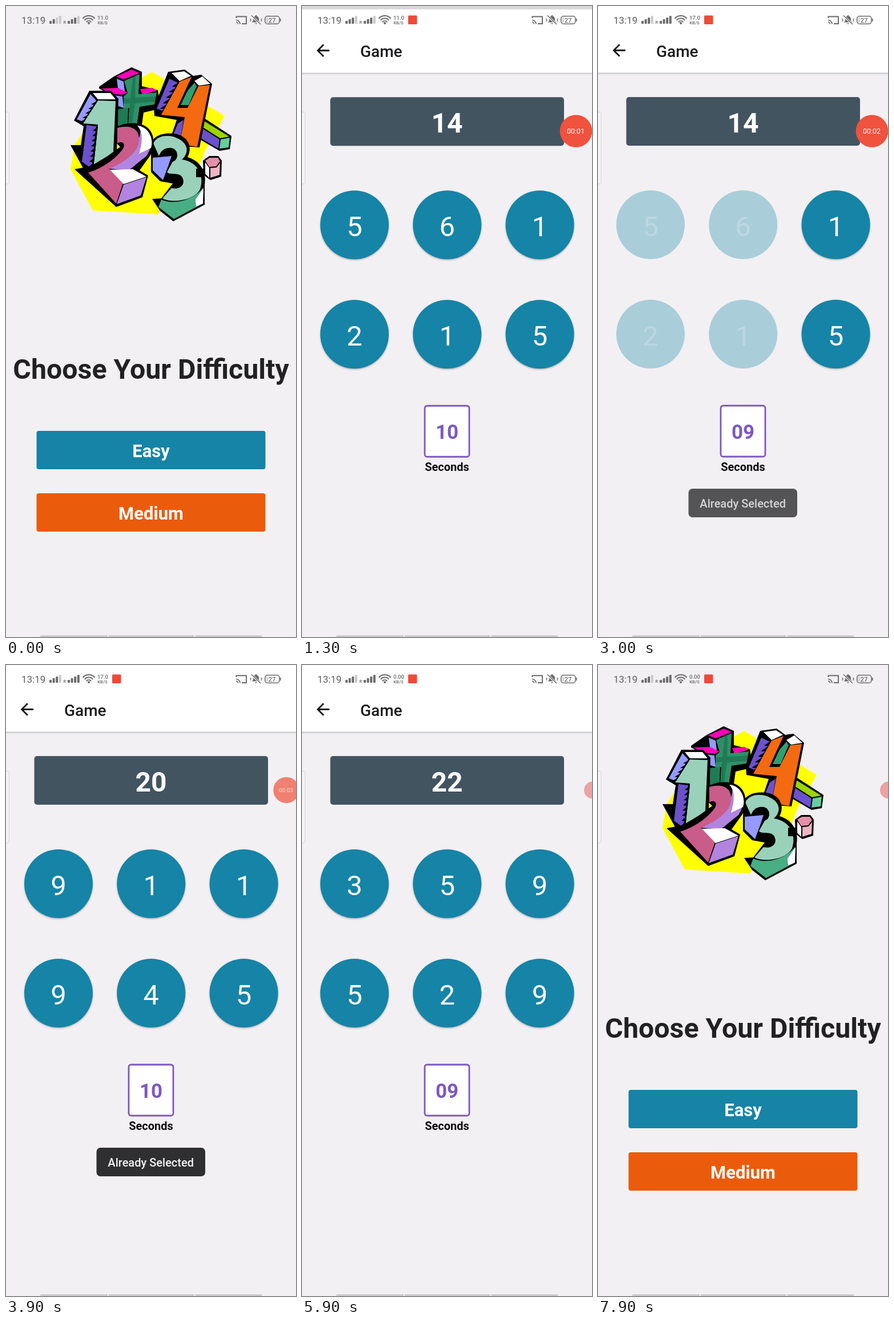
These frames come from a looping animation (508 by 1102 pixels, 8000 ms). An HTML page with a canvas:

```html
<!DOCTYPE html>
<html lang="en">
<head>
<meta charset="utf-8">
<title>Number game</title>
<style>
  html, body { margin: 0; width: 100%; height: 100%; overflow: hidden; background: #f2f0f3; }
  canvas { display: block; width: 508px; height: 1102px; }
</style>
</head>
<body>
<canvas id="stage"></canvas>
<script>
const W = 508, H = 1102, LOOP = 8000;
const BG = '#f2f0f3', TEAL = '#1584a7', GREY = '#6b6b6d';
const canvas = document.getElementById('stage');
const ratio = window.devicePixelRatio || 1;
canvas.width = W * ratio;
canvas.height = H * ratio;
const ctx = canvas.getContext('2d');

// ---------- helpers ----------
const clamp = v => Math.max(0, Math.min(1, v));
const ramp = (t, start, length) => clamp((t - start) / length);
const mix = (a, b, k) => a + (b - a) * k;
const latest = (steps, t) => steps.filter(s => s[0] <= t).pop()[1];

function ease(x) {
  if (x <= 0 || x >= 1) return clamp(x);
  const curve = (a, b, s) => 3 * (1 - s) ** 2 * s * a + 3 * (1 - s) * s * s * b + s ** 3;
  let lo = 0, hi = 1;
  for (let i = 0; i < 24; i++) {
    const mid = (lo + hi) / 2;
    if (curve(0.20833, 0.25, mid) < x) lo = mid; else hi = mid;
  }
  return curve(0.82, 1, lo);
}

function rect(x, y, w, h, color) {
  ctx.fillStyle = color;
  ctx.fillRect(x, y, w, h);
}

function box(x, y, w, h, r, fill, line, width) {
  ctx.beginPath();
  ctx.roundRect(x, y, w, h, r);
  if (fill) { ctx.fillStyle = fill; ctx.fill(); }
  if (line) { ctx.strokeStyle = line; ctx.lineWidth = width; ctx.stroke(); }
}

function disc(x, y, r, color) {
  ctx.beginPath();
  ctx.arc(x, y, r, 0, Math.PI * 2);
  ctx.fillStyle = color;
  ctx.fill();
}

function text(str, x, y, size, weight, color, align = 'center') {
  ctx.font = `${weight} ${size}px Roboto, sans-serif`;
  ctx.textAlign = align;
  ctx.fillStyle = color;
  ctx.fillText(str, x, y);
}

function fill(d, color) {
  ctx.fillStyle = color;
  ctx.fill(new Path2D(d));
}

function line(d, color, width) {
  ctx.strokeStyle = color;
  ctx.lineWidth = width;
  ctx.stroke(new Path2D(d));
}

function shadow(color, blur, dy) {
  ctx.shadowColor = color;
  ctx.shadowBlur = blur * ratio;
  ctx.shadowOffsetY = dy * ratio;
}

// ---------- illustration ----------
const INK = '#000', WHITE = '#fff', BLUE = '#959aff', VIOLET = '#6b52cc';
const LILAC = '#b184e0', MINT = '#9ad1bb', LEAF = '#2f9068', PINK = '#ff00b8', ROSE = '#c95c88';

const plus = [
  [INK, 'M189 123L220 107 238 115V140L266 147 268 160 263 181 241 186 237 214 190 212 192 160 163 144V141Z'],
  [PINK, 'M193 123L220 111 234 117 206 128Z'],
  [PINK, 'M168 144L196 143 213 151 204 155 181 153Z'],
  [PINK, 'M235 145L257 143 264 148 239 155Z'],
  [BLUE, 'M194 127L206 132 208 149 196 143Z'],
  [BLUE, 'M183 155L204 158 206 178 194 174Z'],
  [LEAF, 'M207 131L234 119 232 154 264 151 260 172 234 176 229 210 214 212 216 178 206 180 206 158 213 152Z'],
  ['#1f7a55', 'M196 180L214 178 213 210 196 209Z'],
  ['#1f7a55', 'M222 125L227 123 226 160 262 158 260 167 226 170 220 210H214L217 169 206 171V161H218Z']
];
const minus = [
  [INK, 'M338 190L395 227 392 250 374 253 331 228Z'],
  ['#9bd400', 'M344 199L391 228 375 231 342 210Z'],
  [VIOLET, 'M341 212L374 233 372 249 335 227Z'],
  ['#66cda0', 'M376 233L392 230 390 247 374 249Z']
];
const four = [
  [INK, 'M284 115L313 111 328 122 342 120 361 136 339 247 284 243 299 199 260 192 259 178Z'],
  [VIOLET, 'M286 127L301 134 276 184 264 179Z'],
  [VIOLET, 'M287 239L301 205 311 199 304 241Z'],
  [WHITE, 'M290 117L312 114 324 122 304 131Z'],
  [WHITE, 'M330 131L344 123 358 136 338 139Z'],
  ['#2fa070', 'M318 148L330 134 334 140 320 173 306 173Z'],
  ['#f46a10', 'M304 132L325 124 300 178 318 178 337 140 357 138 335 246 304 241 313 194 271 190Z']
];
const one = [
  [INK, 'M146 148L184 148 197 162 193 285 140 292 113 243 131 243 136 210 119 200Z'],
  [BLUE, 'M148 154L158 165 135 202 124 198Z'],
  [VIOLET, 'M141 208L158 210 150 284 133 272Z'],
  [MINT, 'M161 165L192 166 187 278 153 284 161 207 135 205Z'],
  [WHITE, 'M152 152L183 152 192 163 161 163Z']
];
const three = [
  [INK, 'M254 244C256 224 280 220 300 224C322 230 326 250 318 264C340 270 352 290 348 312V347L293 376 270 358 256 337 272 336 292 310 270 306 254 290Z'],
  [BLUE, 'M257 265L290 262 284 280 275 304 257 287Z'],
  [MINT, 'M258 240C264 226 284 224 298 230C322 240 320 258 308 268C336 272 348 296 340 320C330 340 290 345 274 336L290 318C306 322 316 310 308 298C302 290 286 296 282 290L292 272C304 268 302 250 290 248C276 246 270 256 268 262Z'],
  ['#48ae83', 'M272 338C290 347 325 342 345 318V345L294 372 267 351Z'],
  [WHITE, 'M332 338L346 318 345 345 333 350Z']
];
const two = [
  [INK, 'M190 214C205 203 228 202 243 209C262 220 262 245 252 262L234 287 249 296 239 334 193 351 120 285 148 280 178 262 200 246 190 236Z'],
  [LILAC, 'M236 210C258 220 258 245 246 262L215 287 180 284C215 268 236 245 236 210Z'],
  [WHITE, 'M230 209C252 211 259 235 254 248L233 258C240 235 240 220 230 209Z'],
  [ROSE, 'M195 213C215 207 236 212 233 238C229 262 195 278 180 285L215 294 204 312 193 345 144 291C170 283 190 268 203 252C212 240 203 234 195 240Z'],
  [WHITE, 'M182 286L222 285 246 298 206 311Z'],
  [LILAC, 'M206 312L246 299 236 331 194 346Z']
];
const dot = [
  [INK, 'M333 284H348V299H333Z'],
  [INK, 'M345 270L356 262 372 262 378 270 377 298 358 304 346 295Z'],
  ['#e490aa', 'M349 270L357 265 371 265 375 271 368 280 356 281Z'],
  [WHITE, 'M349 273L356 283V300L349 293Z'],
  ['#f0b4c6', 'M358 283L369 282 375 274 374 295 358 300Z']
];

function teeth(x1, y1, x2, y2, count, depth) {
  ctx.beginPath();
  ctx.moveTo(x1, y1);
  for (let i = 1; i <= count; i++) {
    const x = mix(x1, x2, i / count), y = mix(y1, y2, i / count);
    ctx.lineTo(x - depth, y - 1);
    ctx.lineTo(x, y);
  }
  ctx.closePath();
  ctx.fillStyle = INK;
  ctx.fill();
}

function drawArt() {
  const draw = parts => parts.forEach(([color, d]) => fill(d, color));
  fill('M256 115L383 192 350 250 330 300 266 364 152 357 113 285 120 243 175 160Z', '#ffff00');
  draw(plus);
  draw(minus);
  draw(four);
  teeth(304, 132, 272, 190, 6, 8);
  draw(one);
  teeth(161, 165, 136, 204, 5, 7);
  teeth(161, 210, 153, 282, 8, 8);
  draw(three);
  draw(two);
  draw(dot);
}

// ---------- screens ----------
function drawHome() {
  rect(0, 0, W, H + 30, BG);
  drawArt();
  text('Choose Your Difficulty', 254, 651, 48.3, 700, '#212123');
  box(53.5, 742, 401, 67, 4, TEAL);
  text('Easy', 254, 788, 31, 700, WHITE);
  box(53.5, 851, 401, 67, 4, '#eb5b0c');
  text('Medium', 254, 897, 31, 700, WHITE);
}

// Each tap is [tile index, time].
const rounds = [
  { start: 0, goal: 14, tiles: [5, 6, 1, 2, 1, 5], taps: [[0, 1600], [1, 1900], [3, 2150], [4, 2650]] },
  { start: 3300, goal: 20, tiles: [9, 1, 1, 9, 4, 5], taps: [[0, 4150], [2, 4400], [4, 4700], [3, 5040]] },
  { start: 5350, goal: 22, tiles: [3, 5, 9, 5, 2, 9], taps: [] }
];
const seconds = [[0, '10'], [2300, '09'], [3300, '10'], [4500, '09'], [5350, '10'], [5900, '09']];

function drawTile(i, digit, tap, t) {
  const x = 92 + (i % 3) * 162.3, y = i < 3 ? 382 : 573;
  const age = tap === undefined ? -1 : t - tap;
  const k = ramp(age, 0, 150);
  if (age >= 0 && age < 150) {
    disc(x, y, 60, '#93b5be');
    ctx.save();
    ctx.translate(x, y);
    fill('M-27 -53H27L54 -27V29L27 55H-27L-54 29V-27Z', '#c0dbe2');
    ctx.restore();
  } else {
    ctx.save();
    ctx.globalAlpha = mix(1, 0.326, k);
    if (!k) shadow('rgba(0,0,0,.28)', 3, 1.5);
    disc(x, y, 60, TEAL);
    ctx.restore();
  }
  text(digit, x, y + 20, 49, 400, `rgba(255,255,255,${mix(1, 0.2, k)})`);
}

function drawGame(t) {
  rect(0, 0, W, H, BG);
  ctx.save();
  shadow('rgba(0,0,0,.25)', 3, 1);
  rect(-5, -5, W + 10, 121.5, WHITE);
  ctx.restore();
  line('M48 77.5H28M37.8 67.3L27.6 77.5 37.8 87.7', '#141416', 2.8);
  text('Game', 102, 88.5, 28, 500, '#1c1c1e', 'left');

  const round = rounds.filter(r => r.start <= t).pop();
  box(49.5, 159, 409.5, 85, 5, '#435461');
  text(round.goal, 254, 221, 48, 700, WHITE);
  const taps = new Map(round.taps.filter(tap => tap[1] <= t));
  round.tiles.forEach((digit, i) => drawTile(i, digit, taps.get(i), t));

  box(215, 698, 78, 89, 4, WHITE, '#7e57c2', 2.8);
  text(latest(seconds, t), 254, 756, 35, 700, '#7e57c2');
  text('Seconds', 254, 812, 20, 700, '#0c0c0d');
}

// ---------- system overlays ----------
function drawBars(x, full) {
  for (let i = 0; i < 4; i++) {
    const h = 5 + i * 2.9;
    box(x + i * 5.6, 31 - h, 4, h, 1, i < full ? GREY : '#c9c8ca');
  }
}

function drawStatus(t) {
  text('13:19', 27, 31, 17, 400, '#5e5e60', 'left');
  drawBars(76, t < 100 ? 2 : 3);
  text('R', 100.5, 31, 7.5, 500, GREY, 'left');
  drawBars(108, t < 1800 ? 3 : 4);

  ctx.lineCap = 'round';
  for (const r of [14, 9.5, 5]) {
    ctx.beginPath();
    ctx.arc(145, 31, r, -Math.PI * 0.75, -Math.PI * 0.25);
    ctx.strokeStyle = GREY;
    ctx.lineWidth = 2.2;
    ctx.stroke();
  }
  ctx.lineCap = 'butt';
  disc(145, 30, 2, GREY);
  text(latest([[0, '11.0'], [1800, '17.0'], [5300, '0.00']], t), 169.5, 23.5, 9.7, 500, GREY);
  text('KB/S', 169, 32, 7.8, 500, GREY);
  if (t >= 100) box(186, 16.5, 15.5, 15.5, 1.5, '#ee4a36');

  line('M403.5 21V18.5H421V31H413', GREY, 2);
  line('M403 24.5A7 7 0 0 1 410 31.5M403 28A3.5 3.5 0 0 1 406.5 31.5', GREY, 1.7);
  fill('M430.5 28.5L433 26V22.5C433 19.5 435 18 437 17.5V16H439V17.5C441.5 18 443 20 443 22.5V26L445.5 28.5ZM436 30H440Q438 33 436 30Z', GREY);
  line('M430 17L446 32', WHITE, 3.5);
  line('M430 16.5L446 32', GREY, 1.7);
  line('M428.5 22V27M447.5 22V27', GREY, 1.5);
  box(453.8, 17.8, 25, 13.4, 4, null, GREY, 1.6);
  rect(456, 20, 2.5, 9, '#c9c8ca');
  rect(480, 22, 1.6, 5, GREY);
  text('27', 466, 28.7, 11.5, 500, GREY);

  box(-8, 185, 13.5, 126, 4, 'rgba(246,245,247,.6)', '#d3d2d4', 1);
  box(59.5, 1099, 389, 8, 3, '#cbcacc');
  rect(178, 1099, 2, 3, BG);
  rect(329.5, 1099, 2, 3, BG);
}

function drawToast(t) {
  const alpha = Math.min(ramp(t, 2800, 250), 1 - ramp(t, 4950, 380));
  if (!alpha) return;
  ctx.save();
  ctx.globalAlpha = alpha;
  box(158.5, 843, 190.5, 50, 7, '#2f2f31');
  text('Already Selected', 253.7, 876, 20, 500, '#f4f4f5');
  ctx.restore();
}

function drawRecorder(t) {
  if (t < 100) return;
  const small = ramp(t, 3580, 200), tucked = ramp(t, 4100, 250);
  const x = mix(mix(480, 491, small), 509, tucked);
  const r = mix(mix(28.3, 22.7, small), 15, tucked);
  ctx.save();
  ctx.globalAlpha = mix(mix(1, 0.7, small), 0.48, tucked);
  disc(x, 218.5, r, tucked ? '#e84e4b' : '#f0523d');
  if (tucked < 1) {
    ctx.globalAlpha *= 1 - tucked;
    text('00:0' + Math.floor((t - 100) / 1000), x - 0.5, 218.5 + r * 0.16, r * 0.44, 400, WHITE);
  }
  ctx.restore();
}

// ---------- timeline ----------
function render(t) {
  ctx.setTransform(ratio, 0, 0, ratio, 0, 0);
  const open = t < 4000 ? ease(ramp(t, 959, 425)) : 1 - ease(ramp(t, 7060, 425));
  if (open < 1) {
    ctx.save();
    ctx.translate(0, -H * 0.02 * open);
    drawHome();
    ctx.restore();
    rect(0, 0, W, H, `rgba(0,0,0,${0.1 * clamp(open / 0.36)})`);
  }
  if (open > 0) {
    // The new screen is uncovered from the bottom while rising slightly.
    ctx.save();
    ctx.beginPath();
    ctx.rect(0, H * (1 - open), W, H);
    ctx.clip();
    ctx.translate(0, H * 0.041 * (1 - open));
    drawGame(t);
    ctx.restore();
  }
  drawStatus(t);
  drawToast(t);
  drawRecorder(t);
}

const begun = performance.now();
function tick() {
  render((performance.now() - begun) % LOOP);
  requestAnimationFrame(tick);
}
tick();
</script>
</body>
</html>
```
